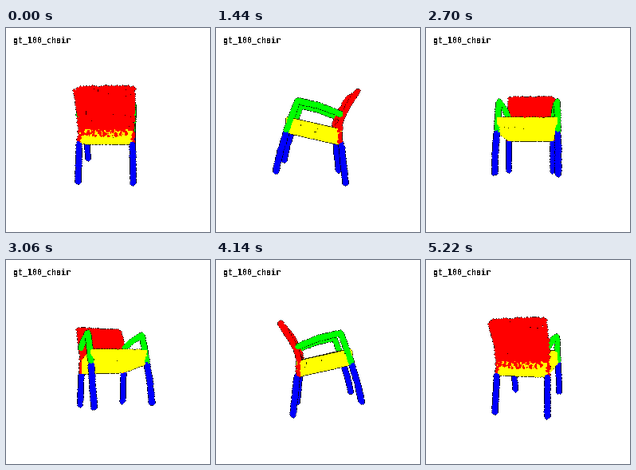
A matplotlib script that plays this animation: 256 px wide and 256 px high, repeating every 5.4 s.

```python
import numpy as np
import matplotlib.pyplot as plt
from matplotlib.animation import FuncAnimation

SIZE, FRAMES, STEP_MS = 256, 30, 180
PERSP, TILT = 0.0038, 0.03      # perspective strength, camera tilt
YAW, SHIFT = np.radians(4.4), -1.2
RED, YELLOW, BLUE, GREEN = (255, 0, 0), (255, 255, 0), (0, 0, 255), (0, 255, 0)

rng = np.random.default_rng(7)


# Chair coordinates: x sideways, y towards the back, h downwards.
def tube(n, *path, radius=1.9):
    """Random points on a round tube that follows a polyline."""
    path = np.array(path, float)
    length = np.r_[0, np.cumsum(np.linalg.norm(np.diff(path, axis=0), axis=1))]
    s = rng.uniform(0, length[-1], n)
    core = np.stack([np.interp(s, length, path[:, i]) for i in range(3)], 1)
    shell = rng.normal(size=(n, 3))
    return core + radius * shell / np.linalg.norm(shell, axis=1, keepdims=True)


def seat(n):
    """Slab sloping down to the back, sampled on its six faces."""
    p = rng.uniform(0, 1, (n, 3))
    axis = rng.choice(3, n, p=(0.2, 0.2, 0.6))
    p[np.arange(n), axis] = p[np.arange(n), axis].round()
    a, b, c = p.T
    return np.stack([(2 * a - 1) * (32 - 3 * b),
                     -35.3 + 59 * b,
                     -14 + 13.5 * b + 14.5 * c], 1)


def backrest(n):
    """Curved panel leaning backwards, with a cut-out along the bottom."""
    t = rng.uniform(-1, 1, n)
    h = rng.uniform(-46.5, 14, n)
    keep = (h < 6) | (abs(t) > 0.9)
    t, h = t[keep], h[keep]
    lean = 18.5 * (np.clip(-7 - h, 0, None) / 38) ** 1.3
    bow = 5 * np.clip((4 - h) / 49, 0, 1) * (1 - t ** 2)
    y = 22.8 + lean + bow + rng.uniform(-1.5, 1.5, len(t))
    return np.stack([32 * t, y, h], 1)


def side_frame():
    """Back leg, front leg and armrest of one side."""
    return [
        (BLUE, tube(600, (30.4, 24.5, 14.5), (31, 29, 57.5))),
        (BLUE, tube(600, (33, -36, 1), (33.3, -42.5, 22), (32.8, -47.3, 43.6))),
        (GREEN, tube(1000, (33, -36, 0), (33.3, -24, -33.3),
                     (32.3, 0, -28), (31, 24, -18.5))),
    ]


parts = [(RED, backrest(2900)), (YELLOW, seat(6000))]
for side in (-1, 1):
    parts += [(color, p * (side, 1, 1)) for color, p in side_frame()]
POINTS = np.concatenate([p for _, p in parts])
COLORS = np.concatenate([np.tile(c, (len(p), 1)) for c, p in parts])

# Each point is a small ball: bright core and a dark rim lying deeper.
BALL = []
for dx in range(-2, 3):
    for dy in range(-2, 3):
        r2 = dx * dx + dy * dy
        if r2 <= 2:
            BALL.append((dx, dy, (5 - r2) ** 0.5, 1.0))
        elif r2 == 4:
            BALL.append((dx, dy, -10, 0.15))


def render(theta):
    x, y, h = POINTS.T
    c, s = np.cos(theta - YAW), np.sin(theta - YAW)
    right = x * c + y * s + SHIFT * np.cos(theta)
    near = y * c - x * s - SHIFT * np.sin(theta)
    d = 1 - PERSP * near
    u = np.rint(SIZE / 2 + right / d).astype(int)
    v = np.rint(SIZE / 2 + (h + TILT * near) / d).astype(int)
    us, vs, depth, shade = (np.concatenate(a) for a in zip(
        *[(u + dx, v + dy, near + z, COLORS * k) for dx, dy, z, k in BALL]))
    order = np.argsort(depth, kind="stable")
    img = np.full((SIZE, SIZE, 3), 255, np.uint8)
    img[vs[order], us[order]] = shade[order]
    return img


fig = plt.figure(figsize=(2.56, 2.56), dpi=100, facecolor="white")
ax = fig.add_axes([0, 0, 1, 1])
ax.axis("off")
picture = ax.imshow(render(0), interpolation="nearest", aspect="auto",
                    extent=(0, SIZE, SIZE, 0))
ax.text(9.5, 19, "gt_100_chair", family="DejaVu Sans Mono", weight="bold",
        size=7.2, va="baseline", color="black", antialiased=False)


def update(i):
    picture.set_data(render(2 * np.pi * i / FRAMES))
    return [picture]


anim = FuncAnimation(fig, update, frames=FRAMES, interval=STEP_MS, repeat=True)
plt.show()
```
